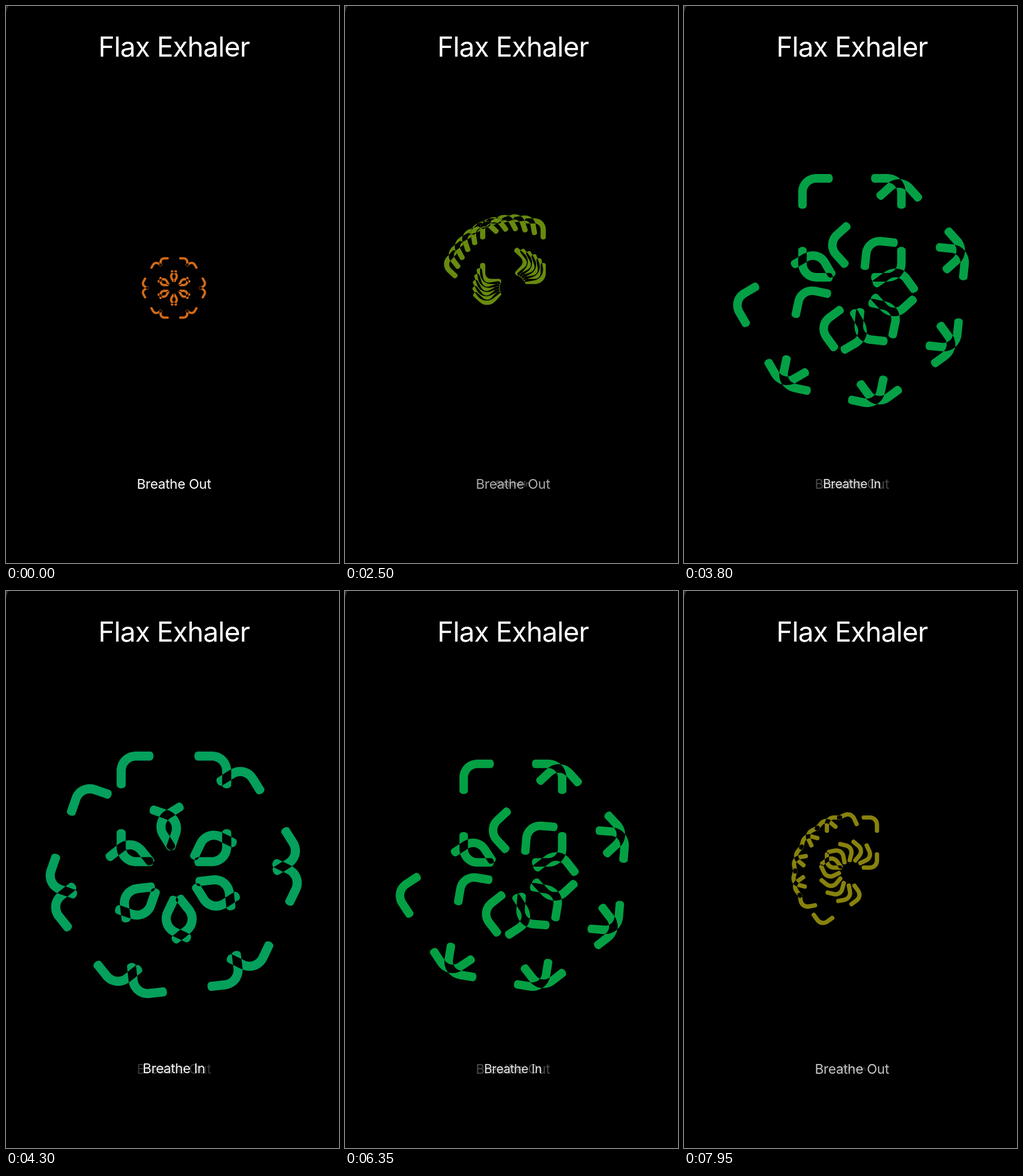
An HTML page that plays this animation: 579x968 px, repeating every 8000 ms.

```html
<!DOCTYPE html>
<html lang="en">
<head>
<meta charset="utf-8">
<title>Flax Exhaler</title>
<style>
  html, body { margin: 0; width: 100%; height: 100%; overflow: hidden; background: #000; }
  svg { display: block; width: 100vw; height: 100vh; }
  text { font-family: Inter, Roboto, sans-serif; fill: #fff; text-anchor: middle; }
  .title { font-size: 48px; letter-spacing: -0.02em; }
  .cue { font-size: 23.5px; letter-spacing: -0.3px; }
</style>
</head>
<body>
<svg viewBox="0 0 579 968">
  <rect width="579" height="968" fill="#000"/>
  <path d="M0 0H5Q1 5 0 14Z" fill="#2c2c2c"/>
  <text class="title" x="292" y="87.5">Flax Exhaler</text>
  <path id="flower" fill-rule="evenodd" transform="translate(292 490)"/>
  <text id="out" class="cue" x="292" y="838.5">Breathe Out</text>
  <text id="in" class="cue" y="8.5">Breathe In</text>
</svg>
<script>
const LOOP = 8000, MOVE = 4000, OPEN_AT = 685, CLOSE_AT = 5445;
const PETALS = 6, HALF = 101, LIFT = 113;

// One rounded bracket, measured inwards from its corner.
const BRACKET = [
  ['M', 0, 34], ['C', 0, 15, 15, 0, 34, 0],
  ['L', 59, 0], ['C', 67, 0, 67, 16, 59, 16],
  ['L', 34, 16], ['C', 24, 16, 16, 24, 16, 34],
  ['L', 16, 59], ['C', 16, 67, 0, 67, 0, 59]
];
const SIDES = [[-1, -1], [1, -1], [-1, 1], [1, 1]];

// Progress, red, green, blue
const COLORS = [
  [0, 210, 106, 24], [0.107, 187, 119, 14], [0.29, 136, 130, 13],
  [0.61, 56, 150, 17], [0.744, 30, 156, 39], [0.893, 4, 160, 68], [1, 4, 160, 97]
];

const flower = document.getElementById('flower');
const outCue = document.getElementById('out');
const inCue = document.getElementById('in');
const clamp = v => Math.min(1, Math.max(0, v));

// cubic-bezier(.42, 0, .58, 1)
function easeInOut(x) {
  let lo = 0, hi = 1, s = x;
  for (let i = 0; i < 24; i++) {
    s = (lo + hi) / 2;
    const r = 1 - s;
    const at = 1.26 * s * r * r + 1.74 * s * s * r + s * s * s;
    if (at < x) lo = s; else hi = s;
  }
  return s * s * (3 - 2 * s);
}

function openness(t) {
  const start = t < CLOSE_AT ? OPEN_AT : CLOSE_AT;
  const p = easeInOut(clamp((t - start) / MOVE));
  return t < CLOSE_AT ? p : 1 - p;
}

function colorAt(p) {
  const i = Math.max(1, COLORS.findIndex(c => c[0] >= p));
  const a = COLORS[i - 1], b = COLORS[i];
  const k = (p - a[0]) / (b[0] - a[0]);
  const rgb = [1, 2, 3].map(n => Math.round(a[n] + (b[n] - a[n]) * k));
  return `rgb(${rgb})`;
}

function bracketPath(sx, sy, scale, angle) {
  const cos = Math.cos(angle) * scale, sin = Math.sin(angle) * scale;
  let d = '';
  for (const [cmd, ...pts] of BRACKET) {
    d += cmd;
    for (let i = 0; i < pts.length; i += 2) {
      const x = sx * (HALF - pts[i]);
      const y = sy * (HALF - pts[i + 1]) - LIFT;
      d += `${(x * cos - y * sin).toFixed(2)} ${(x * sin + y * cos).toFixed(2)} `;
    }
  }
  return d + 'Z';
}

function flowerPath(p) {
  const scale = 0.25 + 0.75 * p;
  const step = (120 * p - 60) * Math.PI / 180;
  let d = '';
  for (let i = 0; i < PETALS; i++) {
    for (const [sx, sy] of SIDES) d += bracketPath(sx, sy, scale, step * i);
  }
  return d;
}

function render(t) {
  const p = openness(t);
  flower.setAttribute('d', flowerPath(p));
  flower.setAttribute('fill', colorAt(p));
  outCue.setAttribute('opacity', 1 - 0.8 * p);
  inCue.setAttribute('opacity', p);
  inCue.setAttribute('transform', `translate(292 830) scale(${0.2 + 0.8 * p})`);
}

const begin = performance.now();
function tick() {
  render((performance.now() - begin) % LOOP);
  requestAnimationFrame(tick);
}
tick();
</script>
</body>
</html>
```
